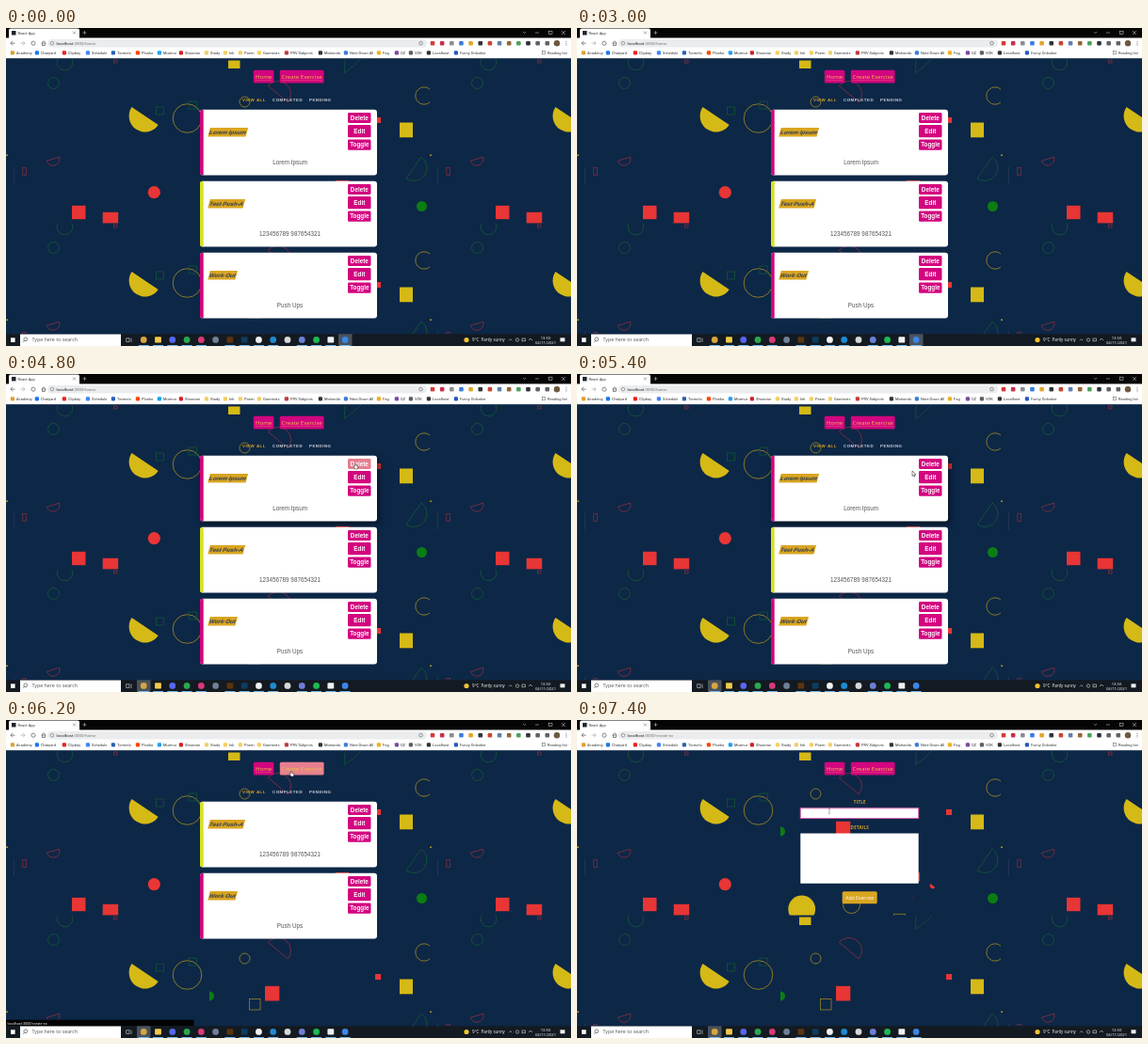
Write an HTML page with a canvas that moves like this. It is 600 by 338 pixels and loops after 8 s.

```html
<!DOCTYPE html>
<html lang="en">
<head>
<meta charset="utf-8">
<title>Exercise tracker</title>
<style>
  html, body { margin: 0; width: 100%; height: 100%; overflow: hidden; background: #0d2747; }
  canvas { display: block; width: 100vw; height: 100vh; }
</style>
</head>
<body>
<canvas id="stage"></canvas>
<script>
const W = 600, H = 338, LOOP = 8000;
const SANS = '"Liberation Sans", Arial, sans-serif';
const UI = 'Roboto, sans-serif';
const ROUND = '"Open Sans", sans-serif';
const NAVY = '#0d2747', PINK = '#d3057f', HOVER = '#e57f90', GOLD = '#daa520';
const RED = '#e83535', YELLOW = '#d5b916', GREEN = '#0b7d12';
const THIN_YELLOW = '#a98f1f', THIN_GREEN = '#125c33', THIN_RED = '#8f2e3e';

const canvas = document.getElementById('stage');
const dpr = window.devicePixelRatio || 1;
canvas.width = W * dpr;
canvas.height = H * dpr;
const ctx = canvas.getContext('2d');
ctx.scale(dpr, dpr);

function rect(x, y, w, h, color) {
  ctx.fillStyle = color;
  ctx.fillRect(x, y, w, h);
}

function box(x, y, w, h, color, width = 0.7) {
  ctx.strokeStyle = color;
  ctx.lineWidth = width;
  ctx.strokeRect(x, y, w, h);
}

function rounded(x, y, w, h, r, color) {
  ctx.fillStyle = color;
  ctx.beginPath();
  ctx.roundRect(x, y, w, h, r);
  ctx.fill();
}

function disc(x, y, r, color, from = 0, sweep = 360) {
  const a = from * Math.PI / 180;
  ctx.fillStyle = color;
  ctx.beginPath();
  ctx.arc(x, y, r, a, a + sweep * Math.PI / 180);
  ctx.fill();
}

function ring(x, y, r, color, from = 0, sweep = 360, width = 0.8) {
  const a = from * Math.PI / 180;
  ctx.strokeStyle = color;
  ctx.lineWidth = width;
  ctx.beginPath();
  ctx.arc(x, y, r, a, a + sweep * Math.PI / 180);
  ctx.closePath();
  ctx.stroke();
}

function line(points, color, width = 0.7) {
  ctx.strokeStyle = color;
  ctx.lineWidth = width;
  ctx.beginPath();
  points.forEach(([x, y]) => ctx.lineTo(x, y));
  ctx.stroke();
}

function text(s, x, y, size, color, { family = UI, style = '', align = 'left', spacing = 0 } = {}) {
  ctx.font = `${style} ${size}px ${family}`;
  ctx.letterSpacing = spacing + 'px';
  ctx.textAlign = align;
  ctx.fillStyle = color;
  ctx.fillText(s, x, y);
}

// Background: one 450 x 175 tile of confetti shapes
function tile() {
  rect(236, 2, 12.5, 8.5, YELLOW);
  disc(147.6, 61, 17, YELLOW, 34, 180);
  ring(192.5, 63.5, 15.3, THIN_YELLOW);
  box(159.5, 51.5, 8, 8, THIN_GREEN);
  box(194, 45.5, 8.5, 8, THIN_GREEN);
  ring(253.5, 46, 5.5, THIN_YELLOW);
  ring(288.8, 37.6, 13.7, THIN_RED, 220, 180);
  disc(216, 86, 5, GREEN, -90, 180);
  rect(275, 75.3, 15.3, 15.7, RED);
  box(258.5, 89, 11.5, 11.5, THIN_YELLOW);
  rect(392, 62.5, 6, 6, RED);
  rect(418, 68, 14, 15.8, YELLOW);
  ring(444, 39.5, 9.2, THIN_YELLOW);
  rect(0.3, 102, 1.5, 1.5, YELLOW);
  ring(433, 116, 14, THIN_GREEN, -55, 180);
  ring(50.5, 26, 6, THIN_GREEN);
  ring(50, 106.7, 7, THIN_RED, -17, 180);
  box(17.8, 115.8, 3.5, 8.2, THIN_RED);
  line([[8.5, 115], [8.5, 133]], '#2c4160', 0.6);
  rect(70, 156.3, 14.5, 14.4, RED);
  rect(102.7, 163.3, 16.5, 12, RED);
  disc(157.3, 142.2, 6.6, RED);
  disc(238.7, 168.5, 14.4, YELLOW);
  ring(62.5, 4, 8.3, THIN_GREEN);
  box(114.5, 1.5, 3.5, 3, THIN_RED);
  disc(441.5, 157, 5.5, GREEN);
  ring(291.5, 164, 9, THIN_YELLOW);
  box(336.5, 173.7, 12, 8, THIN_YELLOW);
  line([[360, 1], [359.5, 15], [369, 8], [377, 0]], THIN_GREEN);
  rect(350, 129.5, 14, 9.5, RED);
  disc(377.8, 143.7, 3, RED, 35, 190);
  rect(355.5, 156, 1, 1, THIN_RED);
}

function background() {
  rect(0, 32, W, 294, NAVY);
  for (const y of [32.5, 207.5]) {
    for (const x of [0, 450]) {
      ctx.save();
      ctx.beginPath();
      ctx.rect(x, y, 450, 175);
      ctx.clip();
      ctx.translate(x, y);
      tile();
      ctx.restore();
    }
  }
}

const BOOKMARKS = [
  ['Academy', 11, '#e0a030'], ['Chatyard', 37, '#1877f2'], ['Clipbay', 66, '#f02020'],
  ['Schedule', 91, '#4285f4'], ['Tormelo', 118, '#2a62b5'], ['Plonko', 144, '#ff4500'],
  ['Murmur', 167, '#1da1f2'], ['Showvan', 190, '#d81f26'], ['Study', 217, '#f3cf63'],
  ['Ink', 237, '#f3cf63'], ['Poem', 253, '#f3cf63'], ['Garments', 273, '#f3cf63'],
  ['PRV Subjects', 302, '#c33b3b'], ['Motionda', 338, '#333333'], ['Note Down All', 365, '#3b7dd8'],
  ['Fog', 400, '#f0b020'], ['QZ', 419, '#7a4a9e'], ['VOK', 434, '#5a5f66'],
  ['Localhost', 453, '#333333'], ['Funny Onlooker', 482, '#2757c4']
];
const EXTENSIONS = ['#d83a3a', '#c9304a', '#8a8d91', '#3a7de0', '#e2a52a', '#30343a',
  '#c8452f', '#5f7fae', '#94643a', '#48a35a', '#2b3138', '#5f6368', '#5f6368'];

function browser(path) {
  rect(0, 0, W, 11, '#050505');
  rounded(3, 0.5, 75, 12, 2, '#ffffff');
  rect(6, 3, 4.5, 4.5, '#20232a');
  text('React App', 12.5, 6.7, 4, '#333');
  line([[71, 3.5], [74, 6.5]], '#555', 0.5);
  line([[74, 3.5], [71, 6.5]], '#555', 0.5);
  line([[81.5, 5], [85.5, 5]], '#ddd', 0.5);
  line([[83.5, 3], [83.5, 7]], '#ddd', 0.5);
  line([[549, 4], [550.5, 5.5], [552, 4]], '#ddd', 0.5);
  line([[562, 5], [566, 5]], '#ddd', 0.5);
  box(576.5, 3.2, 3.5, 3.5, '#ddd', 0.5);
  line([[590, 3], [594, 7]], '#ddd', 0.5);
  line([[594, 3], [590, 7]], '#ddd', 0.5);

  rect(0, 10.5, W, 21.7, '#ffffff');
  rounded(44, 12, 403, 8.4, 4.2, '#eaecee');
  line([[7, 14], [5, 16.2], [7, 18.4]], '#555');
  line([[5, 16.2], [9.5, 16.2]], '#555');
  line([[18, 14], [20, 16.2], [18, 18.4]], '#aaa');
  line([[15.5, 16.2], [20, 16.2]], '#aaa');
  ring(29, 16.2, 2.1, '#555', 0, 300, 0.7);
  line([[37.5, 16], [40, 13.8], [42.5, 16]], '#555');
  box(38.4, 16, 3.2, 2.5, '#555');
  ring(49, 16.2, 1.8, '#555', 0, 360, 0.5);
  text('localhost', 53.5, 17.8, 4.4, '#222');
  text(':3000/' + path, 53.5 + ctx.measureText('localhost').width, 17.8, 4.4, '#777');
  ring(440.5, 16.2, 1.8, '#555', 0, 360, 0.6);
  EXTENSIONS.forEach((c, i) => rounded(450.7 + i * 10.15, 14, 4.6, 4.6, 1, c));
  disc(585, 16.2, 3.2, '#6b5a40');
  for (const y of [14.3, 16.2, 18.1]) disc(595, y, 0.5, '#555');

  for (const [name, x, color] of BOOKMARKS) {
    rounded(x - 6.2, 24.3, 4.2, 4.2, 1, color);
    text(name, x, 28, 4, '#333');
  }
  box(569.5, 24.7, 3, 3.2, '#555', 0.5);
  text('Reading list', 575, 28, 4, '#333');
}

const APPS = ['#d9a441', '#f2c94c', '#5865f2', '#2aa84f', '#d83a78', '#6f7f96', '#5a3510',
  '#0d3d60', '#f2f2f2', '#1f8ad2', '#d8d8d8', '#6b7fd8', '#1db954', '#f0f0f0', '#3b86e8'];
const SQUARE_APPS = [1, 6, 7, 13];

function taskbar(browserActive) {
  rect(0, 325.3, W, 13, '#131a21');
  rect(5, 329.3, 4.6, 4.6, '#ffffff');
  rect(15, 325.5, 107, 12.5, '#ffffff');
  ring(20.8, 330.8, 1.9, '#333', 0, 360, 0.6);
  line([[19.5, 332.2], [18.1, 333.8]], '#333', 0.6);
  text('Type here to search', 27.5, 333.4, 5.3, '#555', { family: ROUND });
  box(127.8, 329.8, 3.2, 3.6, '#ddd', 0.6);
  line([[133, 329.5], [133, 334]], '#ddd', 0.6);
  rect(browserActive ? 139 : 353, 325.3, 14.5, 12.7, '#4a535b');
  APPS.forEach((c, i) => {
    const x = 146.2 + i * 15.28;
    if (SQUARE_APPS.includes(i)) rounded(x - 3.4, 328.3, 6.8, 6.2, 0.8, c);
    else disc(x, 331.4, 3.4, c);
    if (i !== 5 && i !== 10) rect(x - 5.5, 337, 11, 1, '#76b9ed');
  });
  disc(489, 331.5, 2.6, '#f3c331');
  text('9°C', 495, 333.2, 4.6, '#fff', { family: ROUND });
  text('Partly sunny', 504.5, 333.2, 4.4, '#fff', { family: ROUND });
  line([[534, 332.3], [535.7, 330.6], [537.4, 332.3]], '#ddd', 0.6);
  ring(543, 331.5, 1.7, '#ddd', 0, 360, 0.6);
  box(548, 330, 3.6, 2.8, '#ddd', 0.6);
  line([[555, 332], [557, 330], [559, 332]], '#ddd', 0.6);
  text('13:50', 573, 330.5, 4.2, '#fff', { family: ROUND, align: 'center' });
  text('04/11/2021', 573, 336.4, 4.2, '#fff', { family: ROUND, align: 'center' });
  rect(588.5, 329.3, 5, 4, '#f0f0f0');
}

function navButton(label, x, w, hover) {
  rounded(x, 44.8, w, 13.8, 1.5, hover ? HOVER : PINK);
  text(label, x + w / 2, 53.9, 6.1, '#f2c04a', { family: ROUND, align: 'center' });
  const half = ctx.measureText(label).width / 2;
  line([[x + w / 2 - half, 55.6], [x + w / 2 + half, 55.6]], 'rgba(242,192,74,.5)', 0.5);
}

function filters() {
  const caps = { family: SANS, style: 'bold', spacing: 0.5 };
  text('VIEW ALL', 251, 78.3, 4.4, GOLD, caps);
  text('COMPLETED', 283, 78.3, 4.4, '#d0d3d8', caps);
  text('PENDING', 322, 78.3, 4.4, '#d0d3d8', caps);
}

function card([title, details, edge], y, lifted, hoverDelete) {
  ctx.save();
  if (lifted) {
    ctx.shadowColor = 'rgba(0,0,0,.55)';
    ctx.shadowBlur = 6 * dpr;
    ctx.shadowOffsetX = 2 * dpr;
    ctx.shadowOffsetY = 3 * dpr;
  }
  rounded(206, y, 188, 69.8, 3, '#ffffff');
  ctx.restore();
  rounded(206, y, 3.7, 69.8, [3, 0, 0, 3], edge);

  ctx.save();
  ctx.translate(214.2, y + 28.8);
  ctx.transform(1, 0, -0.27, 1, 0, 0);
  ctx.font = `bold italic 6.2px ${SANS}`;
  ctx.letterSpacing = '0px';
  const w = ctx.measureText(title).width;
  rect(0, -9.6, w + 1.5, 9.6, GOLD);
  text(title, 0.7, -2.6, 6.2, '#3c4550', { family: SANS, style: 'bold italic' });
  line([[0.7, -4.4], [w + 0.7, -4.4]], 'rgba(60,69,80,.6)', 0.5);
  ctx.restore();

  text(details, 301.5, y + 57.8, 6.3, '#555', { family: SANS, align: 'center' });
  [['Delete', 3.3, 10.8], ['Edit', 16.3, 13.2], ['Toggle', 31.8, 11.2]].forEach(([label, dy, h], i) => {
    rounded(363, y + dy, 24.5, h, 1.3, hoverDelete && i === 0 ? HOVER : PINK);
    text(label, 375.3, y + dy + h / 2 + 2.2, 6.3, '#fff', { family: SANS, style: 'bold', align: 'center' });
  });
}

const CARDS = [
  ['Lorem Ipsum', 'Lorem Ipsum', PINK],
  ['Test Push-A', '123456789 987654321', '#d9e021'],
  ['Work Out', 'Push Ups', PINK]
];

function form(focused) {
  const label = { family: ROUND, style: 'bold', spacing: 0.3, align: 'center' };
  text('TITLE', 300.3, 88.6, 4.4, GOLD, label);
  text('DETAILS', 300.3, 115.8, 4.4, GOLD, label);
  rect(237.3, 93.6, 125.4, 10.9, '#fff');
  if (focused) box(237.3, 93.8, 125.4, 10.7, '#dd62b0', 1);
  rect(237.3, 120.5, 125.4, 53.2, '#fff');
  rounded(281.7, 182.2, 37, 13, 1.5, GOLD);
  text('Add Exercise', 300.2, 190.6, 5.1, '#fff', { family: ROUND, align: 'center' });
}

function statusBar() {
  rect(0, 318.7, 199.5, 6.7, '#030303');
  text('localhost:3000/create-ex', 1.5, 323.6, 3.8, '#f4f4f4');
}

const POINTERS = {
  arrow: [[0, 0], [0, 5.6], [1.4, 4.4], [2.3, 6.3], [3, 6], [2.2, 4], [4, 4]],
  hand: [[0, 0], [-0.7, 0.6], [-0.7, 3], [-1.7, 2.6], [-1.7, 3.6], [-0.4, 6], [2.4, 6], [3, 3.2], [0.8, 2.4], [0.7, 0.6]]
};

function pointer([, x, y, kind]) {
  if (kind === 'beam') {
    line([[x, y - 2.5], [x, y + 2.5]], '#555', 0.5);
    line([[x - 1, y - 2.5], [x + 1, y - 2.5]], '#555', 0.4);
    line([[x - 1, y + 2.5], [x + 1, y + 2.5]], '#555', 0.4);
    return;
  }
  ctx.beginPath();
  POINTERS[kind].forEach(([px, py]) => ctx.lineTo(x + px, y + py));
  ctx.closePath();
  ctx.fillStyle = '#fff';
  ctx.strokeStyle = '#111';
  ctx.lineWidth = 0.5;
  ctx.fill();
  ctx.stroke();
}

// Pointer stops: time, x, y, shape
const STOPS = [
  [3600, 224, 51, 'arrow'], [3800, 269, 94, 'arrow'], [4000, 318, 108, 'arrow'],
  [4200, 358, 108, 'arrow'], [4400, 380, 97, 'hand'], [4600, 374, 98, 'hand'],
  [4800, 371, 95, 'hand'], [5000, 373, 96, 'hand'], [5200, 371, 97, 'hand'],
  [5400, 356, 103, 'arrow'], [5600, 314, 78, 'hand'], [5800, 276, 51, 'hand'],
  [6000, 310, 52, 'hand'], [6200, 303, 54, 'hand'], [6400, 293, 69, 'arrow'],
  [6600, 272, 92, 'arrow'], [6800, 267, 98, 'beam'], [7000, 271, 99, 'beam'], [7400, 268, 97, 'beam']
];

function draw(t) {
  const during = (from, to) => t >= from && t < to;
  const onForm = t >= 6400;
  background();
  navButton('Home', 262.8, 21.6, during(5800, 6000));
  navButton('Create Exercise', 290.8, 46.8, during(6000, 6600));
  if (onForm) {
    form(t >= 7000);
  } else {
    filters();
    const list = t < 5600 ? CARDS : CARDS.slice(1);
    list.forEach((c, i) => card(c, 86.8 + i * 76, i === 0 && during(4000, 5600), i === 0 && during(4400, 5400)));
  }
  if (during(6200, 6800)) statusBar();
  browser(onForm ? 'create-ex' : 'home');
  taskbar(t >= 4400);
  const stop = STOPS.filter(s => s[0] <= t).pop();
  if (stop) pointer(stop);
}

const start = performance.now();
function frame() {
  draw((performance.now() - start) % LOOP);
  requestAnimationFrame(frame);
}
frame();
</script>
</body>
</html>
```
